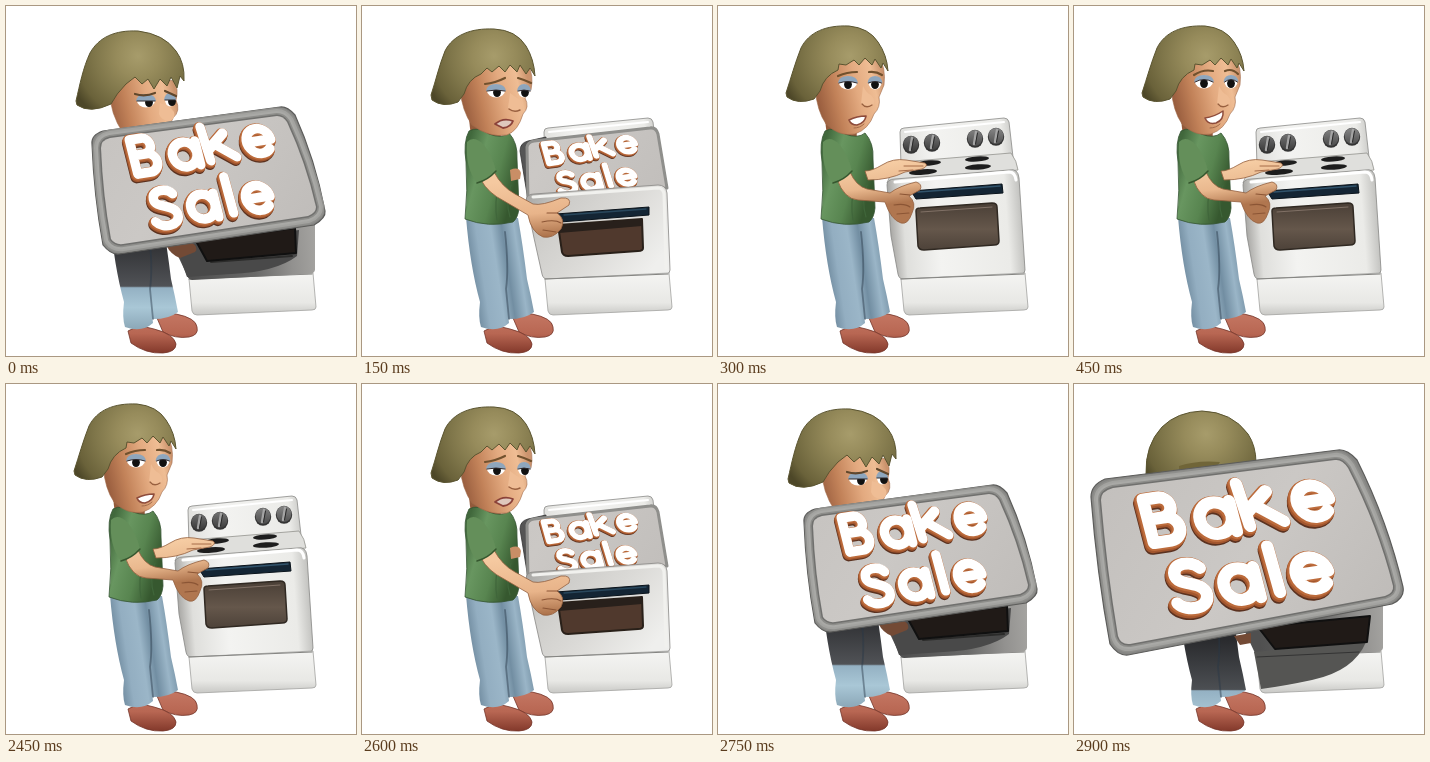
An HTML page for the animation above (4.9 s loop, 350 by 350 pixels).

```html
<!DOCTYPE html>
<html lang="en">
<head>
<meta charset="utf-8">
<title>Bake Sale</title>
<style>
html, body { margin: 0; width: 100%; height: 100%; overflow: hidden; background: #fff; }
svg { display: block; width: 100vw; height: 100vh; }
</style>
</head>
<body>
<svg id="stage" viewBox="0 0 350 350" role="img" aria-label="Bake Sale"></svg>
<script>
const path = (d, fill, extra = '') => `<path d="${d}" fill="${fill}" ${extra}/>`;
const line = (d, color, width = 1) =>
  `<path d="${d}" fill="none" stroke="${color}" stroke-width="${width}" stroke-linecap="round" stroke-linejoin="round"/>`;
const edged = (d, fill, color, width = .8) =>
  path(d, fill, `stroke="${color}" stroke-width="${width}" stroke-linejoin="round"`);
const oval = (x, y, rx, ry, fill, turn = 0) =>
  `<ellipse cx="${x}" cy="${y}" rx="${rx}" ry="${ry}" fill="${fill}" transform="rotate(${turn} ${x} ${y})"/>`;
const group = (body, attrs = '') => `<g ${attrs}>${body}</g>`;

const stops = list => list.map(([at, color]) => `<stop offset="${at}" stop-color="${color}"/>`).join('');
const linear = (id, box, list) => {
  const [x1, y1, x2, y2] = box;
  return `<linearGradient id="${id}" gradientUnits="userSpaceOnUse" x1="${x1}" y1="${y1}" x2="${x2}" y2="${y2}">${stops(list)}</linearGradient>`;
};
const radial = (id, x, y, r, list) =>
  `<radialGradient id="${id}" gradientUnits="userSpaceOnUse" cx="${x}" cy="${y}" r="${r}">${stops(list)}</radialGradient>`;

const defs = '<defs>' + [
  radial('hair', 132, 50, 72, [[0, '#a79c6b'], [.3, '#968b5b'], [.6, '#7f764a'], [.85, '#6a623a'], [1, '#4d4728']]),
  linear('skin', [98, 98, 168, 82], [[0, '#94593b'], [.3, '#c28259'], [.6, '#e3aa80'], [.85, '#efbd94'], [1, '#cb936d']]),
  linear('arm', [140, 160, 146, 202], [[0, '#f6cda4'], [.55, '#e9b88e'], [1, '#b0764f']]),
  linear('hand', [180, 172, 186, 235], [[0, '#f5c9a0'], [.55, '#e8b48a'], [1, '#a1663f']]),
  linear('shirt', [103, 150, 157, 165], [[0, '#41683c'], [.3, '#689660'], [.65, '#588550'], [1, '#36582f']]),
  linear('jeans', [105, 255, 172, 245], [[0, '#6a8599'], [.2, '#93aec1'], [.42, '#9bb6c8'], [.58, '#728ea2'], [.76, '#9ab5c7'], [1, '#617e92']]),
  linear('jeansA', [0, 240, 0, 322], [[0, '#323336'], [.49, '#505256'], [.51, '#94b1c3'], [.75, '#a9c7d6'], [1, '#8da9b9']]),
  linear('jeansE', [0, 255, 0, 326], [[0, '#292a2d'], [.71, '#4c4f53'], [.73, '#94b1c3'], [1, '#a6c3d2']]),
  linear('shoe', [0, 308, 0, 347], [[0, '#c47662'], [.5, '#b86753'], [1, '#83392b']]),
  linear('white', [172, 215, 309, 205], [[0, '#aaa9a6'], [.1, '#dfdfdc'], [.35, '#f3f3f1'], [.85, '#ebebe8'], [1, '#b3b3b0']]),
  linear('whiteB', [170, 185, 280, 275], [[0, '#a9a8a5'], [.25, '#cecdca'], [.6, '#dcdbd8'], [1, '#efefed']]),
  linear('shade', [185, 250, 310, 240], [[0, '#505050'], [.5, '#696968'], [.8, '#92918f'], [1, '#a4a3a0']]),
  linear('drawer', [0, 268, 0, 309], [[0, '#f4f4f2'], [.7, '#e8e8e5'], [1, '#c8c8c5']]),
  linear('glass', [0, 198, 0, 244], [[0, '#4b4037'], [.55, '#65574b'], [1, '#4d4239']]),
  linear('face', [40, 80, 310, 250], [[0, '#c3c0bd'], [.5, '#cbc8c5'], [1, '#bebbb8']]),
  linear('knob', [0, 122, 0, 146], [[0, '#868686'], [1, '#383838']])
].join('') + '</defs>';

// Raised lettering: one centre line per letter, baseline at 0
const glyphs = {
  B: 'M0 0V-39H13a9 9 0 0 1 0 18H0M13-21h2a10.5 10.5 0 0 1 0 21H0',
  a: 'M28-14a14 14 0 1 1-28 0a14 14 0 1 1 28 0M29-27V0',
  k: 'M0 0V-38M23-28L1-12M10-17L30 0',
  e: 'M1-14H29A14 14 0 1 0 25-4',
  S: 'M26-34C20-42 3-42 3-31C3-20 27-23 27-10C27 3 6 3 0-6',
  l: 'M0 0V-41'
};
const letters = [
  ['B', 80, 159, .25], ['a', 130, 152, .25], ['k', 176, 142, .32], ['e', 227, 135, .3],
  ['S', 105, 226, .22], ['a', 154, 218, .25], ['l', 206, 208, .27], ['e', 226, 207, .3]
];
function lettering(matrix) {
  const layer = (dx, dy, color, width) => letters.map(([ch, x, y, lean]) =>
    group(line(glyphs[ch], color, width),
      `transform="matrix(1.13 -.17 ${-lean * 1.15} 1.11 ${x + dx} ${y + dy})"`.replace(`${-lean * 1.15}`, `${lean * 1.15}`))).join('');
  return group(
    layer(-2.2, 4.5, '#5b3220', 13) + layer(-1.6, 2.6, '#a2562e', 13.4) +
    layer(-.8, .8, '#bd6c3c', 13) + layer(0, 0, '#fff', 10.8),
    `transform="matrix(${matrix})"`);
}

// A rounded rim built from narrowing bands around the panel
const bands = [[17, '#8f8f8c'], [14, '#a3a3a0'], [10, '#a9a9a6'], [6, '#8d8d8a'], [3, '#70706e']];
const board = (outer, inner, matrix) => edged(outer, '#858583', '#5c5c5a', 1.2) +
  bands.map(([width, color]) => line(inner, color, width)).join('') +
  path(inner, 'url(#face)') + lettering(matrix);

const boardA = () => board(
  'M97 125L274 101Q281 100 289 109Q309 153 319 205Q320 212 308 219L113 248Q105 249 97 239Q88 190 86 138Q85 129 97 125Z',
  'M104 132L271 110Q277 110 281 116Q300 157 310 201Q310 207 302 210L117 238Q109 239 105 233Q97 190 95 142Q95 134 104 132Z',
  '.76 0 0 .79 71 42.5');
const boardE = () => board(
  'M31 95L264 66Q273 65 283 76Q314 138 329 203Q331 214 318 220L54 271Q44 272 36 260Q23 190 17 113Q17 101 31 95Z',
  'M39 104L261 76Q268 75 274 84Q304 142 319 202Q320 209 311 212L56 260Q47 261 44 252Q33 187 27 116Q27 107 39 104Z',
  '1 0 0 1 0 0');

const drawer = () => edged('M183 273L307 267L310 301Q310 304 306 304L191 309Q187 309 186 305Z', 'url(#drawer)', '#a3a3a0') +
  line('M183 273L306 268', '#858582', 1.2);
const backPanel = () => edged('M182 126Q182 122 186 122L286 112Q290 112 291 116L295 151L183 160Z', 'url(#white)', '#8b8b88') +
  line('M187 126L286 116', '#fff', 2);
const knob = (x, y) => oval(x, y + .8, 8.2, 9, '#333') + oval(x, y, 7.4, 8, 'url(#knob)') +
  line(`M${x + 1} ${y - 6}L${x - 1} ${y + 6}`, '#a4a4a4', 2.4) +
  line(`M${x + 2.5} ${y - 5}L${x + .5} ${y + 6}`, '#292929', 1);
const handle = d => edged(d, '#142534', '#0a131b', 1);

function openStove() {
  return backPanel() + [[193, 138], [214, 136], [257, 132], [278, 130]].map(p => knob(...p)).join('') +
    edged('M184 156L293 147Q299 155 300 164L169 177Q174 162 184 156Z', '#dfdfdc', '#93938f') +
    oval(211, 157, 12, 2.7, '#1d1d1d', -4) + oval(259, 153, 12, 2.6, '#1d1d1d', -4) +
    oval(205, 166, 14, 2.8, '#1d1d1d', -4) + oval(260, 161, 13, 2.7, '#1d1d1d', -4) +
    edged('M169 179Q169 173 177 173L291 164Q300 162 301 172L307 264Q307 268 303 268L185 273Q181 273 180 268L173 230Z', 'url(#white)', '#878784') +
    line('M177 176L291 166Q297 166 298 174', '#fff', 3) +
    edged('M198 205Q198 202 202 202L274 197Q279 197 279 201L281 235Q281 239 276 239L206 244Q201 244 200 240Z', 'url(#glass)', '#302922', 1.5) +
    line('M203 206L274 201', '#817166', 1) +
    handle('M193 185L284 178L285 187L198 193Z') + line('M200 186L282 180', '#31536b', 1.5) + drawer();
}

function halfStove() {
  return backPanel() +
    edged('M158 145Q158 137 166 135L184 131L184 190L166 194Z', '#555', '#333') +
    edged('M165 141Q166 136 172 135L288 122Q294 121 296 128L305 182L166 196Z', 'url(#face)', '#8f8f8c', 3) +
    lettering('.49 0 0 .45 148 86') +
    edged('M164 194Q165 188 172 188L296 179Q304 179 305 187L308 264Q308 268 304 268L185 273Q181 273 180 268L172 232Z', 'url(#whiteB)', '#888784') +
    line('M171 191L296 182Q301 182 302 188L304 262', '#f1f1ee', 3) +
    edged('M196 219L280 213L281 242Q281 245 276 245L206 250Q201 250 200 246Z', '#50392d', '#292019', 2) +
    path('M196 219L280 213L280 220L197 227Z', '#28201b') +
    handle('M194 208L287 201L287 209L198 216Z') + line('M202 209L284 203', '#29475c', 1.3) + drawer();
}

function shadedStove(deep) {
  const glass = deep ? 'M184 243L296 232L293 258L201 265Z' : 'M190 235L289 222L290 247L201 255Z';
  return drawer() +
    path('M165 235L309 210L309 264Q308 268 303 268L186 274Q182 274 180 267Z', 'url(#shade)') +
    (deep ? path('M180 268L292 258Q280 287 238 296Q210 302 187 305Z', '#555553') + line('M183 273L285 268', '#333', 1)
          : path('M170 240L293 224L291 250Q270 266 225 268L181 271Z', '#494949') + line('M205 256L286 250', '#2b2b2a', 2)) +
    edged(glass, '#201a17', '#101010', 2);
}

function legs(fill) {
  const shoe = d => edged(d, 'url(#shoe)', '#74352a');
  return shoe('M151 312Q158 306 170 308Q190 312 191 321Q193 329 183 331Q169 333 157 326Z') +
    path('M126 212L156 212Q161 240 165 273Q169 290 172 306Q162 314 143 313L136 270Z', fill) +
    shoe('M122 325Q133 318 148 323Q168 328 170 338Q170 346 157 347Q140 348 125 337Z') +
    path('M104 211L142 214Q146 250 143 282L147 317Q136 327 119 321Q116 312 118 296Q108 260 104 211Z', fill) +
    line('M143 226Q147 262 144 283L147 313', 'rgba(40,55,70,.45)', 1.8);
}

const torso = () => path('M106 104L138 116L139 133L109 131Z', '#935a3b') +
  edged('M107 125Q116 120 127 128Q140 133 147 127Q156 137 155 153L157 202Q156 212 151 216Q126 222 103 213Q106 185 104 156Q101 136 107 125Z', 'url(#shirt)', '#345332') +
  line('M137 174Q132 198 135 214M149 179Q143 196 148 211', '#40663b', 1.2);
const sleeve = () => path('M105 136Q112 129 122 139Q131 151 134 165Q126 174 115 177Q103 162 105 136Z', '#648f5a') +
  line('M134 165Q126 174 115 177', '#36572f', 1.5);

function armsUp() {
  return edged('M147 165Q154 165 164 159Q175 152 188 154L207 157Q211 160 204 163L187 166Q171 174 150 174Z', 'url(#arm)', '#94603f') +
    line('M186 160L205 160M181 165L195 164', '#a66c49', 1) +
    edged('M119 173L132 166Q138 180 149 183L172 187Q181 180 198 176Q205 178 202 184L191 190Q199 197 194 207Q190 219 183 217Q173 214 167 196L140 194Q126 193 119 173Z', 'url(#arm)', '#94603f') +
    line('M176 199Q187 197 192 201M179 208L191 207M182 188L192 189', '#8b5535', 1.1);
}
function armsDown() {
  return path('M148 164Q157 160 159 167L158 173L149 175Z', '#c98e66') +
    edged('M119 174L132 166Q140 181 153 188L171 198Q180 200 199 192Q210 191 207 199L195 207Q204 213 199 223Q191 233 181 231Q169 226 166 209L142 195Q126 187 119 174Z', 'url(#hand)', '#94603f') +
    line('M180 216Q193 213 199 217M181 224L194 226M185 207L196 207', '#8b5535', 1.1);
}

const hairShape = d => edged(d, 'url(#hair)', '#5a5430', 1);
const faceShape = d => edged(d, 'url(#skin)', '#a06b4b', .6);
const nose = d => path(d, '#efbd95');

function eye(x, y, rx, look, lid) {
  return oval(x, y, rx, 6.5, '#fff') + oval(x + look, y + 1.5, 3.9, 4.6, '#111') +
    path(`M${x - rx - 1} ${y}Q${x - rx} ${y - 7} ${x} ${y - 7}Q${x + rx} ${y - 7} ${x + rx + 1} ${y}Q${x} ${y - lid} ${x - rx - 1} ${y}Z`, '#8ea6bd') +
    line(`M${x - rx} ${y}Q${x} ${y - lid} ${x + rx} ${y}`, '#2d2629', 1);
}

// The raised look differs from the tired one only in brows, lids and mouth
function headUp(bright) {
  const lift = bright ? 0 : 1;
  return faceShape('M97 82Q101 58 125 54L161 52Q168 61 166 79L161 91Q163 101 156 108Q151 123 137 128Q121 131 108 118Q99 105 97 82Z') +
    eye(130, 76 + lift, 9, 0, bright ? 5 : 3) + eye(157, 76 + lift, 6.5, 0, bright ? 5 : 3) +
    line(`M120 ${69 + lift}Q129 ${bright ? 63 : 66} 139 ${65 + lift}M151 ${65 + lift}Q158 ${bright ? 62 : 65} 164 ${68 + lift}`, '#71512e', 2.2) +
    nose('M145 80Q149 88 153 89Q159 95 154 100Q147 104 143 98Z') +
    line('M144 98Q148 103 154 99', '#99603f', 1.3) +
    (bright ? edged('M131 112Q140 111 149 105Q150 114 142 117Q134 119 131 112Z', '#fff', '#8d4b3b', 1.5)
            : edged('M131 114Q139 110 148 110Q147 117 139 119Q133 119 131 114Z', '#fff', '#8d4b3b', 1.7)) +
    line('M136 122Q142 122 146 118', '#a46b4a', 1) +
    hairShape('M68 87C73 72 77 57 83 42C91 26 108 19 131 20Q151 22 160 36Q169 49 170 65L165 57L163 62L157 53L154 59L147 52L141 59L136 54L128 59L121 58L120 64Q106 70 102 85L96 93Q80 99 69 91Z');
}

function headMid() {
  return faceShape('M98 83Q105 61 126 57L166 59Q172 69 169 84L163 92Q168 101 161 108Q156 125 145 129Q127 132 110 119Q100 105 98 83Z') +
    eye(134, 85, 9, 1, 2) + eye(162, 85, 6, 1, 2) +
    line('M123 78Q133 77 143 72M156 72Q163 74 169 77', '#71512e', 2.2) +
    nose('M148 87Q153 91 158 94Q163 101 158 105Q150 108 146 102Z') +
    line('M147 103Q152 107 158 104', '#99603f', 1.4) +
    edged('M133 118Q141 111 151 115Q149 121 141 122Z', '#dfc8bd', '#8b4239', 1.8) +
    hairShape('M69 89C74 74 77 60 83 45C91 29 109 22 132 23Q154 24 164 40Q172 53 173 70L168 62L164 68L158 59L155 66L148 59L143 66L137 60L130 66L125 62L119 68Q106 73 102 88L96 96Q81 102 70 94Z');
}

function headLow() {
  return faceShape('M104 87Q111 69 137 69L168 75Q173 83 170 94Q175 105 167 112L161 126L117 127Q104 107 104 87Z') +
    eye(140, 95, 9, 3, 0) + eye(164, 94, 5, 2, 0) +
    line('M129 88Q139 91 149 87M159 85L170 90', '#60472c', 2.2) +
    nose('M154 97Q164 100 168 106Q170 113 163 115Q155 114 153 108Z') +
    hairShape('M70 95C74 78 77 62 84 47C93 31 109 24 132 25Q158 28 170 45Q179 57 178 75L174 70L171 82L165 71L161 80L154 73L148 83L142 73L136 78L129 71L120 78Q110 88 105 98Q84 108 71 99Z');
}

const backHead = () => hairShape('M72 90Q71 61 88 43Q103 28 128 27Q158 28 174 50Q182 62 182 79L155 91Z') +
  path('M105 82Q123 76 146 78L142 84L105 88Z', '#706538');

const hiddenHand = d => path(d, '#734a35');
const standing = (arms, head) => legs('url(#jeans)') + torso() + arms + sleeve() + head;
const poses = {
  low: shadedStove(false) + legs('url(#jeansA)') + hiddenHand('M160 239L186 237Q193 241 189 246L174 252Q165 249 160 239Z') + headLow() + boardA(),
  mid: halfStove() + standing(armsDown(), headMid()),
  tired: openStove() + standing(armsUp(), headUp(false)),
  bright: openStove() + standing(armsUp(), headUp(true)),
  front: shadedStove(true) + legs('url(#jeansE)') + hiddenHand('M160 252L177 249L177 259L166 261Z') + backHead() + boardE()
};
const timeline = [
  [150, 'low'], [300, 'mid'], [450, 'tired'], [2450, 'bright'],
  [2600, 'tired'], [2750, 'mid'], [2900, 'low'], [4900, 'front']
];

const stage = document.getElementById('stage');
stage.innerHTML = defs + Object.entries(poses).map(([name, body]) => group(body, `id="${name}"`)).join('');
const layers = Object.keys(poses).map(name => document.getElementById(name));

function draw(ms) {
  const now = timeline.find(([end]) => ms % 4900 < end)[1];
  for (const el of layers) el.setAttribute('visibility', el.id === now ? 'visible' : 'hidden');
}
const start = performance.now();
function tick() {
  draw(performance.now() - start);
  requestAnimationFrame(tick);
}
draw(0);
requestAnimationFrame(tick);
</script>
</body>
</html>
```
